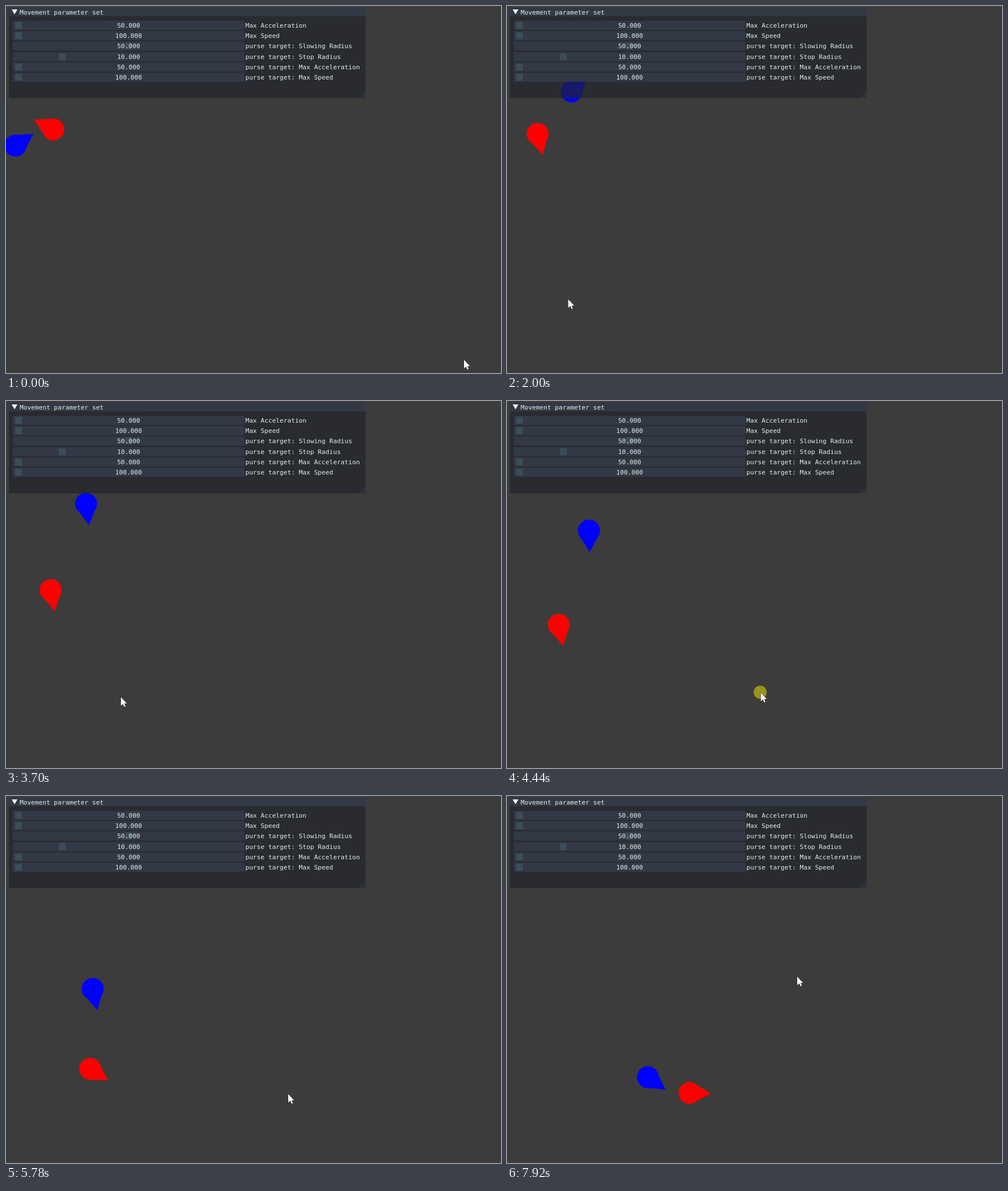
Write an HTML page that moves like this. It is 870 px wide and 644 px high and loops after 7990 ms.

```html
<!DOCTYPE html>
<html lang="en">
<head>
<meta charset="utf-8">
<title>Movement parameter set</title>
<style>
  html, body { margin: 0; width: 100%; height: 100%; overflow: hidden; background: #3c3c3c; }
  svg { display: block; }
  rect { shape-rendering: crispEdges; }
  text { font: 11.15px "DejaVu Sans Mono", monospace; fill: #e4f0ea; white-space: pre; }
  .value { text-anchor: middle; }
  .frame { fill: #333845; }
  .grab { fill: #3d4c59; }
</style>
</head>
<body>
<svg width="870" height="644" viewBox="0 0 870 644">
  <defs>
    <g id="body">
      <circle r="19.3"/>
      <path d="M13 -14L38 0L13 14Z"/>
    </g>
  </defs>
  <use id="blue" href="#body" fill="#00f"/>
  <use id="red" href="#body" fill="#f00"/>
  <g id="panel">
    <rect x="5" y="2" width="627" height="160" fill="#21242b" fill-opacity=".7"/>
    <rect class="frame" x="5" y="2" width="627" height="16"/>
    <path d="M10 6H20L15 14.5Z" fill="#fff"/>
    <path d="M632 149V162H619Z" fill="#2d323a"/>
    <text x="24" y="14.5">Movement parameter set</text>
  </g>
  <g id="cursor">
    <circle id="click" cx="-1" cy="-1" r="11.5" fill="#97941f"/>
    <path d="M0 0V15L3.6 11.8L6 17L8.2 16L6 11H10.5Z" fill="#fff" stroke="#1c1c1c" paint-order="stroke"/>
  </g>
</svg>
<script>
const LOOP = 7.99, STEPS = 119, STEP = LOOP / STEPS;
const byId = id => document.getElementById(id);

// label, value, position of the grab along its track
const sliders = [
  ["Max Acceleration", "50.000", 0],
  ["Max Speed", "100.000", 0],
  ["purse target: Slowing Radius", "50.000", 0.5],
  ["purse target: Stop Radius", "10.000", 0.2],
  ["purse target: Max Acceleration", "50.000", 0],
  ["purse target: Max Speed", "100.000", 0]
];

byId("panel").insertAdjacentHTML("beforeend", sliders.map(([label, value, part], i) => {
  const y = Math.round(26 + i * 18.2);
  return `<rect class="frame" x="12" y="${y}" width="407" height="16"/>
    <rect class="grab" x="${Math.round(16 + part * 386)}" y="${y + 2}" width="12" height="12"/>
    <text class="value" x="215.5" y="${y + 12.3}">${value}</text>
    <text x="420.7" y="${y + 12.3}">${label}</text>`;
}).join(""));

// seconds, x, y, heading in degrees, speed in px/s
const red = [
  [0, 83, 216.5, 207, 45], [1.14, 53, 206, 170, 10], [2.89, 65.5, 270.3, 77, 67],
  [4.44, 91, 393.3, 78, 79], [5.78, 148.3, 479, 33, 80], [6.98, 239.3, 512.5, 10, 84],
  [7.92, 320.7, 521, 2, 88]
];
const blue = [
  [0, 16.5, 245, -33, 86], [1.14, 85, 183, -48, 70], [2.89, 130.3, 149.5, 49, 30],
  [4.44, 144, 228, 88, 73], [5.78, 152.5, 339, 78, 86], [6.98, 191, 436, 56, 86],
  [7.92, 247.5, 493.5, 35, 85]
];
// seconds, x, y: the pointer rests at each stop
const pointer = [
  [0, 805, 621], [0.4, 522, 371], [0.8, 283, 447], [1.02, 200, 487], [1.22, 200, 487],
  [1.7, 108, 518], [2.89, 106, 499], [3.5, 166, 521], [4.36, 446, 512], [4.56, 446, 512],
  [5.78, 496, 523], [6.98, 519, 509], [7.92, 510, 317]
];
const clicks = [1.04, 4.36], CLICK_TIME = 0.2;

// Hermite curve through the stops; the heading follows the direction of travel
function travel(stops, t) {
  const next = Math.max(1, stops.findIndex(s => s[0] >= t));
  const [t0, x0, y0, dir0 = 0, speed0 = 0] = stops[next - 1];
  const [t1, x1, y1, dir1 = 0, speed1 = 0] = stops[next];
  const span = t1 - t0, u = (t - t0) / span, v = 1 - u;
  const axis = (p, q, wave) => {
    const m = wave(dir0 * Math.PI / 180) * speed0 * span;
    const n = wave(dir1 * Math.PI / 180) * speed1 * span;
    return {
      at: v * v * (1 + 2 * u) * p + u * u * (3 - 2 * u) * q + u * v * (v * m - u * n),
      rate: 6 * u * v * (q - p) + v * (1 - 3 * u) * m + u * (3 * u - 2) * n
    };
  };
  const x = axis(x0, x1, Math.cos), y = axis(y0, y1, Math.sin);
  return { x: x.at, y: y.at, heading: Math.atan2(y.rate, x.rate) * 180 / Math.PI };
}

function place(id, stops, t, turns) {
  const { x, y, heading } = travel(stops, t);
  byId(id).setAttribute("transform", `translate(${x} ${y}) rotate(${turns ? heading : 0})`);
}

function draw(seconds) {
  const index = Math.min(STEPS - 1, Math.floor((seconds % LOOP) / STEP + 0.2));
  const t = Math.min(index * STEP, 7.92);
  place("blue", blue, t, true);
  place("red", red, t, true);
  place("cursor", pointer, t, false);
  const pressed = clicks.some(from => t >= from && t < from + CLICK_TIME);
  byId("click").setAttribute("visibility", pressed ? "visible" : "hidden");
}

const start = performance.now();
function tick() {
  draw((performance.now() - start) / 1000);
  requestAnimationFrame(tick);
}
tick();
</script>
</body>
</html>
```
